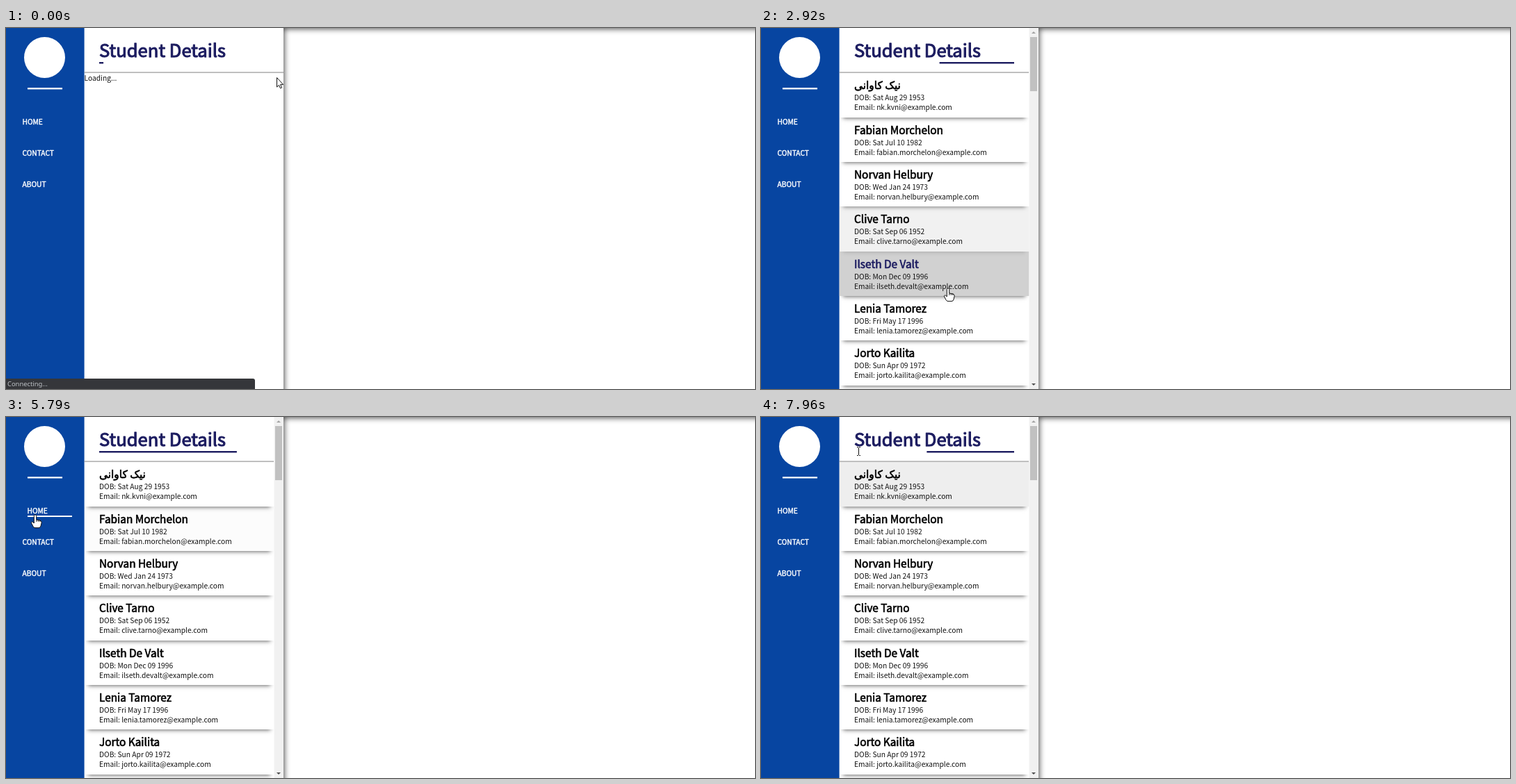
Recreate the animation shown at these times as an HTML page with a canvas. Size 1077 by 520 pixels, loop 7.99 s.

```html
<!DOCTYPE html>
<html lang="en">
<head>
<meta charset="utf-8">
<title>Student Details</title>
<style>
  html, body { margin: 0; width: 100%; height: 100%; overflow: hidden; background: #fff; }
  canvas { display: block; }
</style>
</head>
<body>
<canvas id="stage" width="1077" height="520"></canvas>
<script>
const ctx = document.getElementById('stage').getContext('2d');
const LOOP = 7990, LOADED_AT = 430, HOVER_LAG = 60, FADE = 400, SLIDE = 150, SWEEP = 917;
const BLUE = '#0745a1', NAVY = '#1c1c60';
const SANS = '"Noto Sans CJK JP", "Noto Sans CJK SC", "Noto Sans CJK KR", "Noto Sans CJK", "DejaVu Sans", sans-serif';
const SIDEBAR = 112.6, LIST_RIGHT = 385.5, PANEL_RIGHT = 399;
const ROW_TOP = 64.4, ROW_HEIGHT = 64.3, MENU_TOP = 135, MENU_STEP = 44.8;

const students = [
  ['نیک کاوانی', 'Sat Aug 29 1953', 'nk.kvni'],
  ['Fabian Morchelon', 'Sat Jul 10 1982'],
  ['Norvan Helbury', 'Wed Jan 24 1973'],
  ['Clive Tarno', 'Sat Sep 06 1952'],
  ['Ilseth De Valt', 'Mon Dec 09 1996'],
  ['Lenia Tamorez', 'Fri May 17 1996'],
  ['Jorto Kailita', 'Sun Apr 09 1972']
];
const menu = ['HOME', 'CONTACT', 'ABOUT'];

// Key points of the pointer's walk: time, x, y
const walk = [
  [0, 389, 71], [930, 389, 71], [1700, 320, 88], [1980, 282, 124], [2120, 271, 198],
  [3150, 268, 426], [3490, 267, 426], [3620, 264, 306], [4110, 358, 174], [4350, 400, 160],
  [4900, 345, 152], [5600, 42, 141], [5850, 42, 141], [7150, 45, 213], [7350, 46, 219],
  [7860, 140, 49]
];

const handShape = new Path2D('M-1.7 1.5a1.7 1.7 0 0 1 3.4 0V7l5 1q2.5.6 2.5 3L8 16q-.6 2.6-3 2.6H0q-2 0-3-2l-2.4-4.6q-.6-1.6.8-2 1.2-.3 2.9 2z');
const arrowShape = new Path2D('M.5 .5V14L3.5 11.2 5.5 15.8 7.6 14.9 5.6 10.4H9.6Z');
const beamShape = new Path2D('M-2.5-5.5H-1L0-4.5 1-5.5H2.5M0-4.5V5.5M-2.5 6.5H-1L0 5.5 1 6.5H2.5');

const clamp = v => Math.min(1, Math.max(0, v));
const mix = (a, b, k) => a + (b - a) * k;

function bezier(x1, y1, x2, y2) {
  const axis = (a, b, s) => 3 * a * s * (1 - s) ** 2 + 3 * b * s * s * (1 - s) + s ** 3;
  return v => {
    let lo = 0, hi = 1;
    for (let i = 0; i < 24; i++) {
      const mid = (lo + hi) / 2;
      if (axis(x1, x2, mid) < v) lo = mid; else hi = mid;
    }
    return axis(y1, y2, lo);
  };
}
const ease = bezier(.25, .1, .25, 1);
const easeInOut = bezier(.42, 0, .58, 1);

function pointerAt(t) {
  const next = walk.findIndex(point => point[0] > t);
  if (next < 0) return walk[walk.length - 1].slice(1);
  const [t0, x0, y0] = walk[Math.max(0, next - 1)], [t1, x1, y1] = walk[next];
  const k = clamp((t - t0) / (t1 - t0));
  return [mix(x0, x1, k), mix(y0, y1, k)];
}

// Name of the row or menu entry under a point, if any
function itemAt(x, y) {
  if (x < SIDEBAR) {
    const i = Math.round((y - MENU_TOP) / MENU_STEP);
    return menu[i] && Math.abs(y - MENU_TOP - MENU_STEP * i) < 20 ? 'menu' + i : '';
  }
  return x < LIST_RIGHT && y > ROW_TOP ? 'row' + Math.floor((y - ROW_TOP) / ROW_HEIGHT) : '';
}

// Hover visits follow from the walk, a moment late
const visits = [];
for (let t = 0, current; t < LOOP; t += 5) {
  const item = itemAt(...pointerAt(t - HOVER_LAG));
  if (!current || current.item !== item) visits.push(current = { item, from: t });
  current.to = t + 5;
}

function hoverLevel(item, t, duration) {
  let level = 0;
  for (const v of visits) {
    if (v.item !== item || t < v.from) continue;
    const entered = ease(clamp((Math.min(t, v.to) - v.from) / duration));
    const left = ease(clamp((t - v.to) / duration));
    level = Math.max(level, entered * (1 - left));
  }
  return level;
}
const isHovered = (item, t) => visits.some(v => v.item === item && t >= v.from && t < v.to);

function box(x, y, w, h, color) {
  ctx.fillStyle = color;
  ctx.fillRect(x, y, w, h);
}

function text(str, x, y, size, color, heavy, family = SANS) {
  ctx.font = `${size}px ${family}`;
  ctx.fillStyle = ctx.strokeStyle = color;
  ctx.fillText(str, x, y);
  if (heavy) {
    ctx.lineWidth = size / 24;
    ctx.lineJoin = 'round';
    ctx.strokeText(str, x, y);
  }
}

function shadow(color, blur, dx, dy) {
  ctx.shadowColor = color;
  ctx.shadowBlur = blur;
  ctx.shadowOffsetX = dx;
  ctx.shadowOffsetY = dy;
}

function drawContentArea() {
  ctx.save();
  ctx.beginPath();
  ctx.rect(PANEL_RIGHT, 0, 678, 520);
  ctx.clip();
  shadow('#444', 8, 1, 1);
  ctx.fillStyle = '#000';
  ctx.beginPath();
  ctx.rect(300, -100, 1000, 800);
  ctx.rect(PANEL_RIGHT, 0, 850, 650);
  ctx.fill('evenodd');
  ctx.restore();
}

function drawSidebar(t) {
  box(0, 0, SIDEBAR, 520, BLUE);
  ctx.fillStyle = '#fff';
  ctx.beginPath();
  ctx.arc(55.5, 42.5, 29.5, 0, Math.PI * 2);
  ctx.fill();
  box(31, 86, 50, 2.4, '#fff');
  menu.forEach((label, i) => {
    const y = Math.round(MENU_TOP + MENU_STEP * i), level = hoverLevel('menu' + i, t, SLIDE);
    const x = 24 + 7 * level;
    text(label, x - .5, y + 4, 10.24, '#fff', true);
    box(x, y + 7, 64 * level, 2, '#fff');
  });
}

function drawHeader(t, right) {
  text('Student Details', 134, 41.5, 25.6, NAVY, true);
  box(SIDEBAR, 63.5, right - SIDEBAR, 1, '#808080');

  // The underline sweeps to the right, then back again
  const theta = (.055 + t / SWEEP) % 2;
  const u = 1 - Math.abs(1 - theta);
  const start = 134, full = right - 21 - start;
  const tail = full * easeInOut(clamp(u * 2 - 1)), head = full * easeInOut(clamp(u * 2));
  box(start + tail, 49, head - tail, 2.4, NAVY);
}

function drawRow([name, born, mail], i, t) {
  const item = 'row' + i;
  const top = Math.round(ROW_TOP + ROW_HEIGHT * i), bottom = Math.round(ROW_TOP + ROW_HEIGHT * (i + 1));
  const width = LIST_RIGHT - SIDEBAR;
  box(SIDEBAR, top, width, bottom - top, `rgba(194,194,194,${hoverLevel(item, t, FADE)})`);

  ctx.save();
  ctx.beginPath();
  ctx.rect(SIDEBAR, bottom, width, 12);
  ctx.clip();
  shadow('#666', 6, 0, 1000);
  box(118, top - 1000, 262, bottom - top + 1, '#000');
  ctx.restore();

  mail ||= name.toLowerCase().replace(' ', '.').replace(' ', '');
  text(name, 134, top + 24, 15.36, isHovered(item, t) ? NAVY : '#000', true);
  text('DOB: ' + born, 134, top + 40, 10.24, '#111');
  text(`Email: ${mail}@example.com`, 134, top + 54, 10.24, '#111');
}

function triangle(x, y, h, color) {
  ctx.fillStyle = color;
  ctx.beginPath();
  ctx.moveTo(x - 3, y);
  ctx.lineTo(x + 3, y);
  ctx.lineTo(x, y + h);
  ctx.fill();
}

function drawScrollbar() {
  box(LIST_RIGHT, 0, PANEL_RIGHT - LIST_RIGHT, 520, '#f1f1f1');
  box(387, 13, 10, 78, '#c1c1c1');
  triangle(392, 8, -3, '#a3a3a3');
  triangle(392, 512, 3, '#505050');
}

function drawStatus() {
  ctx.fillStyle = '#35363a';
  ctx.beginPath();
  ctx.roundRect(-4, 505, 362, 20, 3);
  ctx.fill();
  text('Connecting...', 2, 516, 9.4, '#bdc1c6', false, '"Noto Sans", sans-serif');
}

function drawPointer(t) {
  const [x, y] = pointerAt(t).map(Math.round);
  const overTitle = x > SIDEBAR && x < LIST_RIGHT && y < ROW_TOP;
  const shape = itemAt(x, y) ? handShape : overTitle ? beamShape : arrowShape;
  ctx.save();
  ctx.translate(x, y);
  ctx.lineWidth = 1;
  ctx.lineJoin = 'round';
  ctx.strokeStyle = '#111';
  ctx.fillStyle = '#fff';
  if (shape === beamShape) ctx.translate(.5, 0);
  else ctx.fill(shape);
  ctx.stroke(shape);
  if (shape === handShape) {
    for (let finger = 0; finger < 3; finger++) box(1.3 + 2.5 * finger, 7.2, .9, 2.8, '#111');
  }
  ctx.restore();
}

function draw(t) {
  const loaded = t >= LOADED_AT;
  box(0, 0, 1077, 520, '#fff');
  drawContentArea();
  drawSidebar(t);
  drawHeader(t, loaded ? 385 : PANEL_RIGHT);
  if (loaded) {
    students.forEach((student, i) => drawRow(student, i, t));
    drawScrollbar();
  } else {
    text('Loading...', 112.5, 76, 10.24, '#111');
    drawStatus();
  }
  drawPointer(t);
}

const begin = performance.now();
function tick() {
  draw((performance.now() - begin) % LOOP);
  requestAnimationFrame(tick);
}
tick();
</script>
</body>
</html>
```
